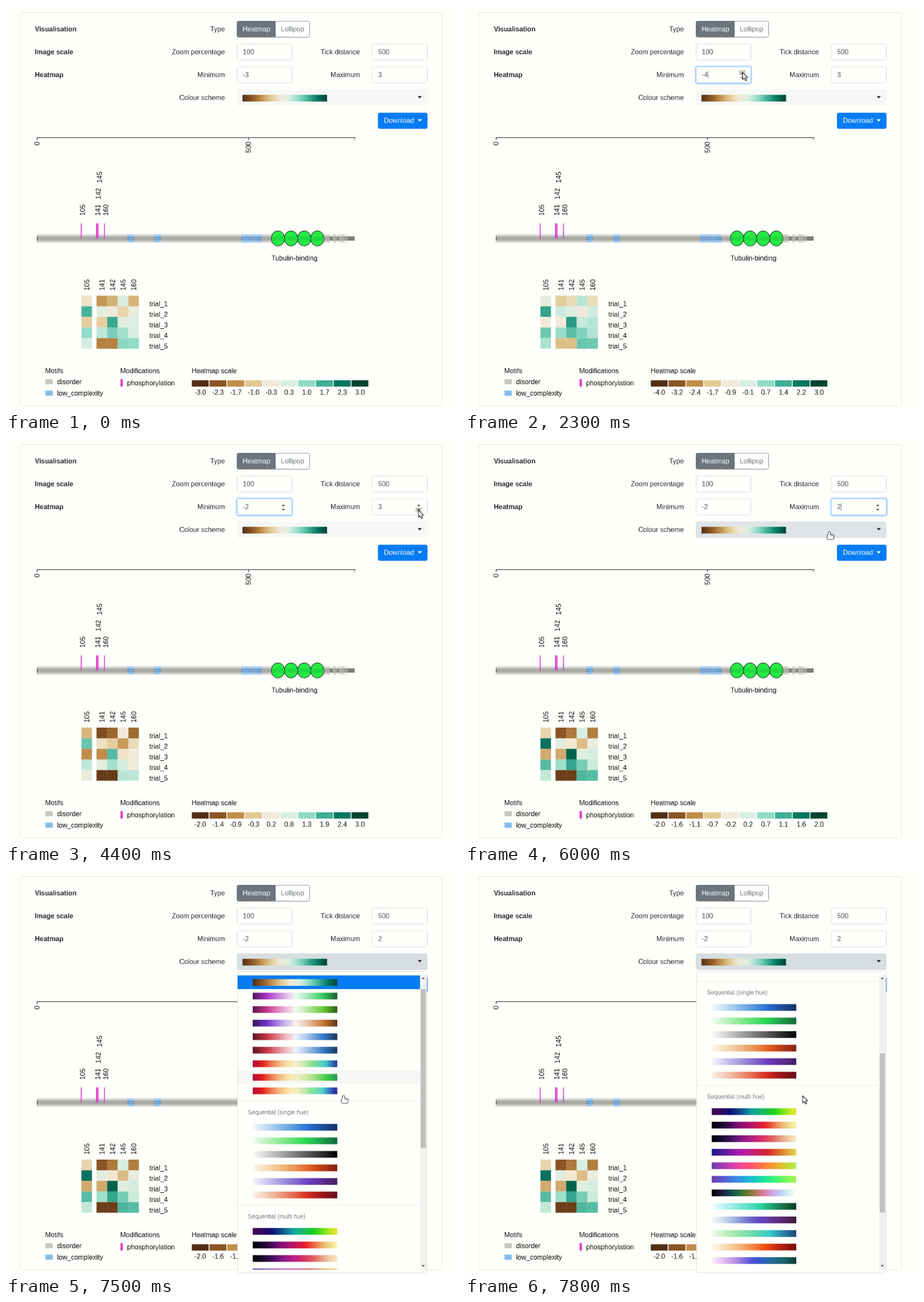
Recreate the animation shown at these times as an HTML page with a canvas. Size 793 px wide and 706 px high, loop 8 s.

```html
<!DOCTYPE html>
<html lang="en">
<head>
<meta charset="utf-8">
<title>Heatmap settings</title>
<style>
  html, body { margin: 0; width: 100%; height: 100%; overflow: hidden; background: #fffffc; }
  canvas { display: block; }
</style>
</head>
<body>
<canvas id="stage" width="793" height="706"></canvas>
<script>
// The page is laid out at full size in a buffer, then shown at 74 %.
const Z = .74, K = 1 / Z, LOOP = 8000;
const view = document.getElementById('stage').getContext('2d');
const page = document.createElement('canvas');
page.width = 1072;
page.height = 955;
const ctx = page.getContext('2d');

const SANS = '"Liberation Sans", Arial, sans-serif';
const INK = '#212529', BLACK = '#0c0c0c', GREY = '#6c757d', BLUE = '#057cf3';
const PAGE = '#fffffc', PINK = '#dd35cb';
const clamp = v => Math.max(0, Math.min(1, v));
const mix = (a, b, f) => a + (b - a) * f;
const smooth = u => u * u * (3 - 2 * u);

// Colour schemes: each one is a list of evenly spaced stops
const brbg = '522d14 8a5524 c08d4b e2c994 f2ead8 d8eee2 90dac5 3fae95 047761 00442f'
  .split(' ').map(c => '#' + c);
const stops = f => Array.from({ length: 25 }, (_, i) => f(i / 24));
const hsl = (h, s, l) => `hsl(${(h + 720) % 360} ${s}% ${l}%)`;

const sweep = (h0, h1, l0 = 97, l1 = 24, s = 68) =>
  stops(t => hsl(mix(h0, h1, t), s, mix(l0, l1, t)));

// two hues meeting in a pale middle
const pair = (a, b, s = 58) => stops(t => {
  const d = Math.abs(2 * t - 1);
  return hsl(t < .5 ? a : b, s, 95 - 73 * d ** 1.15);
});

// red, through pale yellow, to an end hue
const spectral = end => stops(t => {
  const d = Math.abs(2 * t - 1);
  return hsl(mix(55, t < .5 ? -16 : end, d), t < .5 ? 82 : 58, 86 - 50 * d ** 1.3);
});

const helix = (from, to) => stops(t => {
  const [h, s, l] = from.map((v, k) => mix(v, to[k], t));
  const a = (h + 120) * Math.PI / 180, m = s * l * (1 - l), c = Math.cos(a), d = Math.sin(a);
  const rgb = [-.1486 * c + 1.7828 * d, -.2923 * c - .9065 * d, 1.9729 * c];
  return `rgb(${rgb.map(v => Math.round(255 * clamp(l + m * v)))})`;
});

const rdbu = pair(354, 212);
const groups = [
  { title: 'Diverging', y: 196.5, maps: [
    brbg, pair(288, 138), pair(322, 100), pair(265, 27), rdbu, rdbu,
    spectral(230), spectral(148), spectral(248)] },
  { title: 'Sequential (single hue)', y: 449.5, maps: [
    sweep(205, 220), sweep(115, 146), sweep(0, 0, 99, 0, 0),
    sweep(42, 8, 95, 29, 76), sweep(240, 272, 98, 25, 52), sweep(28, -8, 95, 22, 74)] },
  { title: 'Sequential (multi hue)', y: 631.5, maps: [
    sweep(290, 56, 17, 56, 80), sweep(250, 420, 1, 82, 80), sweep(245, 405, 1, 87, 68),
    sweep(244, 417, 31, 58, 72),
    helix([-100, .75, .35], [80, 1.5, .8]), helix([260, .75, .35], [80, 1.5, .8]),
    helix([300, .5, 0], [-240, .5, 1]),
    sweep(185, 146, 97, 14), sweep(195, 300, 97, 16, 48), sweep(100, 215, 95, 30, 60),
    sweep(42, 0, 95, 25, 88), sweep(300, 168, 96, 14, 60)] },
];
const ROW = 23.67;
const rows = groups.flatMap(g => g.maps.map((map, i) => ({ map, y: g.y + 26 + ROW * i })));

// Chart data
const sites = [105, 141, 142, 145, 160];
const trials = [
  [-.5, -1.55, -1.27, .22, -1.23],
  [1.6, .05, -.26, -.76, -.05],
  [-.9, -.9, 1.73, .08, .24],
  [.98, .58, 1.18, .8, .3],
  [.37, -1.8, -1.8, 1.03, .98],
];
const CELL = 18.55;
const colX = i => i ? 158.5 + CELL * (i - 1) : 132;

function scale(v, lo, hi) {
  const p = clamp((v - lo) / (hi - lo)) * 9, i = Math.min(8, Math.floor(p));
  const part = (c, k) => parseInt(c.slice(1 + 2 * k, 3 + 2 * k), 16);
  return `rgb(${[0, 1, 2].map(k => Math.round(mix(part(brbg[i], k), part(brbg[i + 1], k), p - i)))})`;
}

// Drawing helpers
function rect(x, y, w, h, fill) {
  ctx.fillStyle = fill;
  ctx.fillRect(x, y, w, h);
}

function box(x, y, w, h, fill, stroke, r = 3) {
  const snap = v => (Math.round(v * K - .5) + .5) * Z;
  const left = snap(x), top = snap(y);
  ctx.beginPath();
  ctx.roundRect(left, top, snap(x + w) - left, snap(y + h) - top, r);
  if (fill) { ctx.fillStyle = fill; ctx.fill(); }
  if (stroke) { ctx.strokeStyle = stroke; ctx.lineWidth = Z; ctx.stroke(); }
}

function text(s, x, y, { color = INK, align = 'left', size = 16, bold = false, up = false } = {}) {
  ctx.save();
  if (up) ctx.setTransform(0, -1, 1, 0, Math.round(x * K), y * K);
  else ctx.setTransform(1, 0, 0, 1, x * K, Math.round(y * K));
  ctx.font = `${bold ? 'bold ' : ''}${size}px ${SANS}`;
  ctx.fillStyle = color;
  ctx.textAlign = align;
  ctx.fillText(s, 0, 0);
  const width = ctx.measureText(s).width * Z;
  ctx.restore();
  return width;
}

const upright = (s, x, y, align) => text(String(s), x, y, { color: BLACK, align, up: true });
const note = (s, x, y, align) => text(s, x, y, { color: BLACK, align });

function poly(points, fill, stroke) {
  ctx.beginPath();
  points.forEach(([x, y]) => ctx.lineTo(x, y));
  ctx.closePath();
  ctx.fillStyle = fill;
  ctx.fill();
  if (stroke) { ctx.strokeStyle = stroke; ctx.lineWidth = 1.1; ctx.stroke(); }
}

// d is 1 for a triangle pointing down, -1 for up
const tri = (x, y, w, h, d, fill) =>
  poly([[x - w, y - d * h / 2], [x + w, y - d * h / 2], [x, y + d * h / 2]], fill);

function swatch(x, y, map) {
  const g = ctx.createLinearGradient(x, 0, x + 148, 0);
  map.forEach((c, i) => g.addColorStop(i / (map.length - 1), c));
  rect(x, y, 148, 11.8, g);
}

// Timeline: each move has a start, an end and the place it leads to
const moves = [
  [400, 800, 486, 125], [2000, 2100, 486, 116], [3200, 3300, 690, 119], [3400, 3800, 722, 116],
  [4200, 4400, 722, 126], [5500, 6000, 638, 164], [6600, 7200, 591, 394.5],
];
const mouseAt = t => moves.reduce(([x, y], [a, b, toX, toY]) => {
  const f = smooth(clamp((t - a) / (b - a)));
  return [mix(x, toX, f), mix(y, toY, f)];
}, [505, 35]);
const scrollAt = t => 235.5 * clamp((t - 7300) / 500) ** 2.4;

const EDIT = 1200, PICK = 4700, OPEN = 6200;
const minAt = t => t < EDIT ? -3 : t < 2500 ? -4 : t < 3000 ? -3 : -2;
const maxAt = t => t < PICK ? 3 : 2;
const glowAt = (t, from, to) => t < from || t >= to ? 0 : clamp((t - from) / 200 + .4);

function caretOn(t) {
  const press = [EDIT, 2800, 4800].filter(p => p <= t).pop();
  return Math.floor((t - press) / 500) % 2 === 0;
}

const inside = (p, x, y, w, h) => p && p[0] >= x && p[0] < x + w && p[1] >= y && p[1] < y + h;

// Parts
function field(x, y, value, mouse, glow = 0, caret = false) {
  const over = inside(mouse, x, y, 96, 28);
  if (glow) box(x - 2.5, y - 2.5, 101, 33, `rgba(0,123,255,${.25 * glow})`, null, 5);
  box(x, y, 96, 28, PAGE, glow ? '#80bdff' : '#ced4da');
  const width = text(value, x + 10, y + 18, { color: '#495057' });
  if (caret && glow) rect(x + 10 + width, y + 7.5, Z, 13, '#495057');
  if (!over && !glow) return;
  for (const [d, top] of [[-1, y + 5.5], [1, y + 14.5]]) {
    if (inside(mouse, x + 75.5, top, 11, 9)) rect(x + 75.5, top, 11, 9, '#cdcdca');
    tri(x + 81, top + 5 - d * .5, 3, 3.2, d, '#50504e');
  }
}

function form(t, mouse, open) {
  const rowY = i => 44.5 + 40 * i;
  ['Visualisation', 'Image scale', 'Heatmap'].forEach((s, i) => text(s, 50.5, rowY(i), { bold: true }));
  ['Type', 'Zoom percentage', 'Minimum', 'Colour scheme'].forEach((s, i) =>
    text(s, 383, rowY(i), { align: 'right' }));
  ['Tick distance', 'Maximum'].forEach((s, i) => text(s, 619.5, rowY(i + 1), { align: 'right' }));

  const hover = inside(mouse, 472, 26.5, 60, 28);
  box(404.5, 26.5, 127, 28, hover ? GREY : PAGE, GREY);
  box(404.5, 26.5, 67, 28, GREY, GREY, [3, 0, 0, 3]);
  text('Heatmap', 438.5, 44.5, { color: '#fff', align: 'center' });
  text('Lollipop', 501.5, 44.5, { color: hover ? '#fff' : GREY, align: 'center' });

  field(404.5, 66.5, '100', mouse);
  field(641.5, 66.5, '500', mouse);
  field(404.5, 106.5, String(minAt(t)), mouse, glowAt(t, EDIT, PICK), caretOn(t));
  field(641.5, 106.5, String(maxAt(t)), mouse, glowAt(t, PICK, OPEN), caretOn(t));

  const onSelect = inside(mouse, 404.5, 146.5, 333, 28);
  const tone = open ? '#d6dee0' : onSelect ? '#dfe4e6' : '#f6f8f5';
  box(404.5, 146.5, 333, 28, tone, tone);
  swatch(414, 155.2, brbg);
  tri(724.3, 159.5, 3.8, 4, 1, INK);

  box(651.5, 186.5, 86, 28, BLUE, BLUE);
  text('Download', 661.5, 204.5, { color: '#fff' });
  tri(724.3, 200, 3.8, 4, 1, '#fff');
}

function protein() {
  rect(54, 229.6, 557, .9, BLACK);
  [54, 424, 610.2].forEach(x => rect(x, 229.6, .8, 4.5, BLACK));
  upright(0, 58.4, 237, 'right');
  upright(500, 428.5, 237, 'right');

  const core = (x, w, c) => rect(x, 402.5, w, 7.5, c);
  const domain = (x, w, outer, inner) => {
    rect(x, 399, w, 14.5, outer);
    core(x, w, inner);
  };
  core(54, 556.5, '#7f807d');
  [[54, 513], [572, 7], [582.5, 10], [594, 1.5], [597, 1]]
    .forEach(([x, w]) => domain(x, w, '#d4d4d1', '#ababa8'));
  for (const [x, w] of [[213, 10.5], [260, 10.5], [412, 14], [427.5, 14.5], [443, 5.5]]) {
    domain(x, w, '#a3cdf0', '#78a8d6');
    core(x, .7, '#5f87ad');
    core(x + w - .7, .7, '#5f87ad');
  }
  core(54, .8, '#333');

  for (let x = 476; x < 550; x += 23) {
    ctx.save();
    ctx.beginPath();
    ctx.ellipse(x, 406.2, 11.5, 13.1, 0, 0, 2 * Math.PI);
    const ring = () => { ctx.strokeStyle = '#0a200d'; ctx.lineWidth = .9; ctx.stroke(); };
    ctx.fillStyle = '#27eb46';
    ctx.fill();
    ring();
    ctx.clip();
    core(x - 11, 22, '#22d940');
    ctx.restore();
  }
  note('Tubulin-binding', 505, 445, 'center');

  // labels of close neighbours are stacked
  let level = 0;
  sites.forEach((n, i) => {
    const x = 54 + n * Z;
    level = n - sites[i - 1] < 5 ? level + 1 : 0;
    rect(x - .8, 380, 1.6, 26.5, PINK);
    upright(n, x + 6.8, 366.5 - 28.7 * level);
  });
}

function heatmap(lo, hi) {
  sites.forEach((n, i) => upright(n, colX(i) + 13.6, 497.3));
  trials.forEach((vals, r) => {
    const y = 506.2 + CELL * r;
    vals.forEach((v, i) => rect(colX(i), y, CELL, CELL, scale(v, lo, hi)));
    note('trial_' + (r + 1), 251, y + 18.5);
  });

  note('Motifs', 68.7, 641.7);
  rect(69, 652, 13, 9, '#c8c8c6');
  note('disorder', 89.5, 660.5);
  rect(69, 672, 13, 9, '#84bcea');
  note('low_complexity', 89.5, 680.5);
  note('Modifications', 200, 641.7);
  rect(200.5, 652, 4, 13, PINK);
  note('phosphorylation', 212, 662.7);
  note('Heatmap scale', 325, 641.7);
  brbg.forEach((c, i) => {
    rect(325.2 + 31.07 * i, 654.2, 29.6, 11, c);
    note(mix(lo, hi, i / 9).toFixed(1), 340.2 + 31.07 * i, 679, 'center');
  });
}

function menu(s, hot) {
  box(405, 177, 331.5, 527, PAGE, '#d0d1cf');
  ctx.save();
  ctx.beginPath();
  ctx.rect(405.5, 183.5, 330.5, 514.5);
  ctx.clip();
  groups.forEach((g, i) => {
    if (i) rect(405.5, g.y - 20 - s, 319.5, .8, '#e6e9ea');
    text(g.title, 423.5, g.y + 3.7 - s, { color: GREY, size: 14 });
  });
  rows.forEach((r, i) => {
    if (i === 0 || r === hot) rect(405.5, r.y - 12 - s, 319.5, ROW, i ? '#f5f7f4' : BLUE);
    swatch(432, r.y - 5.7 - s, r.map);
  });
  ctx.restore();

  rect(725, 183, 11, 515, '#f1f1ef');
  rect(726, 194 + s * .537, 9, 278, '#c1c1bf');
  tri(730.5, 189, 2.8, 3, -1, s ? '#505050' : '#a3a3a3');
  tri(730.5, 692, 2.8, 3, 1, '#505050');
}

function cursor([x, y], kind) {
  ctx.save();
  ctx.translate(x, y);
  ctx.lineJoin = 'round';
  if (kind === 'hand') {
    ctx.beginPath();
    ctx.roundRect(-1.7, 0, 3.2, 9, 1.5);
    ctx.roundRect(-3.6, 5, 11, 7.8, 2.5);
    ctx.strokeStyle = '#1c1c1c';
    ctx.lineWidth = 1.8;
    ctx.stroke();
    ctx.fillStyle = '#fff';
    ctx.fill();
    [1.7, 3.9, 6].forEach(v => rect(v, 5, .7, 2.6, '#555'));
  } else if (kind === 'beam') {
    rect(-.5, -6.5, 1.2, 13, '#222');
    [-7, 6].forEach(v => rect(-2.5, v, 5, 1, '#222'));
  } else {
    poly([[0, 0], [0, 12.6], [2.9, 10], [4.8, 14.6], [7, 13.7], [5.1, 9.3], [9, 9]], '#fff', '#222');
  }
  ctx.restore();
}

function cursorKind(p, open, hot) {
  if (hot || inside(p, 404.5, 26.5, 127, 28) || inside(p, 404.5, 146.5, 333, 28)) return 'hand';
  const onText = [404.5, 641.5].some(x => [66.5, 106.5].some(y => inside(p, x, y, 75, 28)));
  return onText && !open ? 'beam' : 'arrow';
}

function draw(t) {
  const mouse = t < 400 ? null : mouseAt(t);
  const open = t >= OPEN;
  ctx.setTransform(K, 0, 0, K, 0, 0);
  rect(0, 0, 794, 707, PAGE);
  box(24.5, 11.5, 739, 686.5, null, '#dfe0dd', 4);
  form(t, mouse, open);
  protein();
  // the chart follows the fields one step later
  heatmap(minAt(t - 100), maxAt(t - 100));

  let hot = null;
  if (open) {
    // hover is refreshed only once the list comes to rest
    const s = scrollAt(t), rest = t < 7800 ? 0 : s;
    hot = rows.find(r => Math.abs(r.y - rest - mouse[1]) < 11.8 && mouse[1] > 198);
    menu(s, hot);
  }
  if (mouse) cursor(mouse, cursorKind(mouse, open, hot));

  view.imageSmoothingQuality = 'high';
  view.drawImage(page, 0, 0, page.width * Z, page.height * Z);
}

const start = performance.now();
function tick() {
  const t = (performance.now() - start + 4) % LOOP;
  draw(Math.floor(t / 100) * 100);
  requestAnimationFrame(tick);
}
tick();
</script>
</body>
</html>
```
